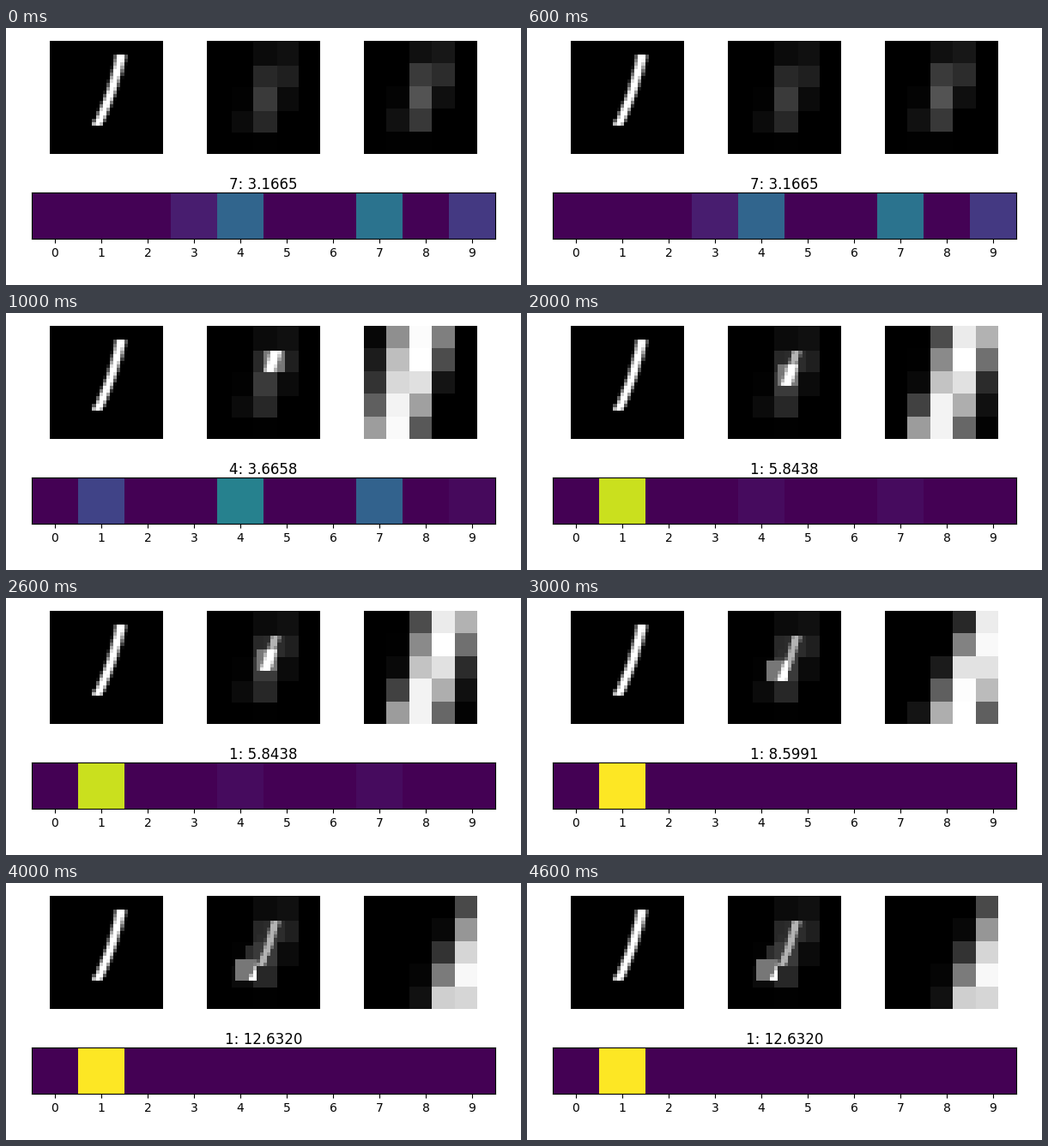
A matplotlib script for the animation above (5000 ms loop, 600 by 300 pixels).

```python
import numpy as np
import matplotlib.pyplot as plt
from matplotlib.animation import FuncAnimation

W, H, DPI = 600, 300, 100
N, G = 32, 5            # image side, glimpse side
CELL = N / G
PATCH = 6               # glimpse footprint on the canvas
PEAK = 1.43             # canvas brightness shown as white
MARK, TRAIL = 0.67, 0.25

# winning score and leading class probabilities per step
BELIEFS = [
    (3.1665, {3: .08, 4: .325, 7: .38, 9: .165}),
    (3.6658, {1: .2, 4: .44, 7: .315, 9: .025}),
    (5.8438, {1: .92, 4: .03, 7: .03}),
    (8.5991, {1: 1}),
    (12.6320, {1: 1}),
]

px = np.arange(N) + 0.5


def draw_digit():
    """A slanted, slightly bowed stroke with soft edges."""
    u = (px - 14) / 9.5
    mid = 17.5 - 3.25 * u - 0.75 * u**2
    dist = np.abs(px - mid[:, None])
    ink = np.clip((1.3 - dist) / 1.3 + 0.5, 0, 1)
    ink[np.abs(u) > 1.05] = 0
    return ink


def hat(centers, width):
    """Triangle filter weights, one row per sample."""
    d = np.abs(px - np.asarray(centers)[:, None])
    return np.clip(1 - d / width, 0, None) / width


def corner(k):
    """Glimpses walk down along the stroke."""
    return 16.2 - 2.6 * (k - 1), 7 + 3.55 * (k - 1)


digit = draw_digit()
steps = (np.arange(G) + 0.5) * CELL
wide = hat(steps, CELL)
coarse = wide @ digit @ wide.T
nearest = np.arange(N) * G // N
base = coarse[np.ix_(nearest, nearest)]


def glimpse(k):
    if k == 0:
        return coarse
    x, y = corner(k)
    return hat(y + steps / G, 1) @ digit @ hat(x + steps / G, 1).T


def canvas(k):
    out = base.copy()
    for i in range(1, k + 1):
        x, y = (round(v) for v in corner(i))
        box = np.s_[y:y + PATCH, x:x + PATCH]
        if i < k:
            out[box] = np.maximum(np.maximum(out[box], TRAIL), digit[box])
        else:
            out[box] = digit[box] + MARK
    return out


def probs(k):
    found = BELIEFS[k][1]
    rest = (1 - sum(found.values())) / 10
    return np.array([[found.get(c, rest) for c in range(10)]])


fig = plt.figure(figsize=(W / DPI, H / DPI), dpi=DPI, facecolor="white")


def panel(x, y, w, h, inset=0.01):
    """Axes at a pixel box, kept just inside the pixel edges."""
    return fig.add_axes([(x + inset) / W, (H - y - h + inset) / H,
                         (w - 2 * inset) / W, (h - 2 * inset) / H])


def show(ax, data, cmap, vmax):
    return ax.imshow(data, cmap=cmap, vmin=0, vmax=vmax,
                     interpolation="nearest", aspect="auto")


def gray_panel(x, data, vmax):
    ax = panel(x, 15, 132, 132)
    ax.axis("off")
    return show(ax, data, "gray", vmax)


gray_panel(51, digit, 1)
canvas_im = gray_panel(234, canvas(0), PEAK)
glimpse_im = gray_panel(417, glimpse(0), 1)

bar = panel(29.98, 192, 540.02, 54)
bar_im = show(bar, probs(0), "viridis", 1)
bar.set_xticks(range(10))
bar.set_yticks([])
title = bar.set_title("", pad=1.44)


def update(k):
    canvas_im.set_data(canvas(k))
    glimpse_im.set_data(glimpse(k))
    p = probs(k)
    bar_im.set_data(p)
    title.set_text(f"{p.argmax()}: {BELIEFS[k][0]:.4f}")
    return canvas_im, glimpse_im, bar_im, title


anim = FuncAnimation(fig, update, frames=len(BELIEFS), interval=1000,
                     repeat=True, repeat_delay=0, blit=False)
plt.show()
```
